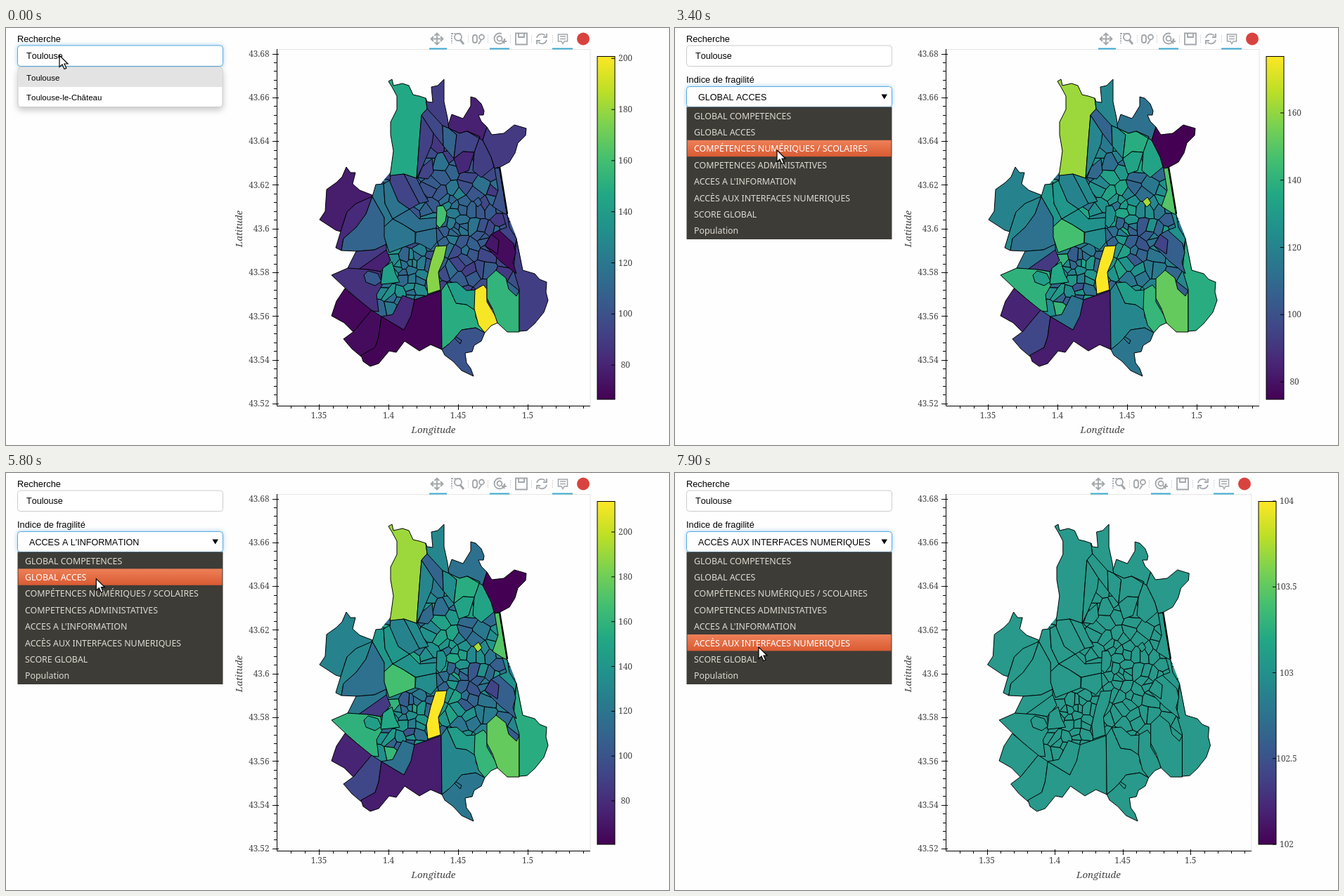
These frames come from a looping animation (943x594 px, 8000 ms). An HTML page:

```html
<!DOCTYPE html>
<html lang="fr">
<head>
<meta charset="utf-8">
<title>Indice de fragilité</title>
<style>
html, body { margin: 0; width: 100%; height: 100%; overflow: hidden; background: #fefefe; }
svg { display: block; width: 943px; height: 594px; }
text { white-space: pre; }
.ui { font: 12.6px "Liberation Sans", Arial, sans-serif; font-kerning: none; fill: #000; }
.label { font-size: 12.8px; }
.small { font-size: 11.5px; }
.option { font: 12.4px "Noto Sans", sans-serif; fill: #dfdbd2; }
.tick { font: 11.8px "Noto Serif", serif; fill: #444; }
.title { font: italic 13.4px "Noto Serif", serif; fill: #444; }
.field { fill: #fff; stroke: #ccc; }
.focus { stroke: #5aaade; filter: drop-shadow(0 0 3px rgba(102, 175, 233, .6)); }
.map path { stroke: #000; stroke-width: 1; stroke-linejoin: round; }
.icons { fill: none; stroke: #a1a6a9; stroke-width: 1.8; }
</style>
</head>
<body>
<svg viewBox="0 0 943 594">
  <defs>
    <linearGradient id="scale" x1="0" y1="1" x2="0" y2="0"></linearGradient>
    <linearGradient id="hot" x1="0" y1="0" x2="0" y2="1">
      <stop stop-color="#ee8058"/><stop offset="1" stop-color="#d95b32"/>
    </linearGradient>
    <clipPath id="inner"><path d="M547 205 566 200 580 205 588 124 599 108 610 125 630 140 645 145 680 152 700 195 713 265 726 298 735 345 731 385 700 398 684 404 660 410 640 400 621 380 582 395 566 430 534 415 515 402 520 385 520 350 535 345 540 312 520 310 535 298 535 250 533 222z"/></clipPath>
  </defs>

  <path d="M385 30.5H831" id="top" stroke="#e5e5e5"/>
  <path d="M831 30V538" id="right" stroke="#e5e5e5"/>
  <g class="map" id="map">
    <g id="cells" clip-path="url(#inner)"></g>
    <!-- north -->
    <path data-v=".6 .85" d="M544 76 549 73 551 82 564 79 573 82 579 95 588 97 597 100 599 115 591 124 588 160 584 214 566 208 546 211 549 190 551 175 547 152 547 134 556 116 556 97 549 84z"/>
    <path data-v=".18 .46" d="M597 100 599 105 607 106 605 84 614 82 623 73 623 105 628 128 630 143 621 139 608 130 599 115z"/>
    <path data-v=".09 .37" d="M630 143 629 138 634 123 650 129 661 111 661 98 668 100 676 108 680 118 679 124 672 124 676 133 684 141 678 160 656 147 645 150z"/>
    <path data-v=".17 0" d="M684 141 691 152 708 150 723 138 740 143 739 153 728 164 724 178 716 191 703 198 695 200 690 184 678 160z"/>
    <path data-v=".19 .45" d="M591 124 608 150 606 165 592 198 584 214 588 160z"/>
    <path data-v=".22 .32" d="M599 115 621 139 622 168 608 150 591 124z"/>
    <path data-v=".32 .48" d="M621 139 630 143 641 152 637 186 622 168z"/>
    <path data-v=".2 .62" d="M630 143 645 150 656 147 674 155 666 177 650 176 637 186 641 152z"/>
    <path data-v=".11 .58" d="M637 186 650 176 666 177 658 203 644 208z"/>
    <path data-v=".18 .58" d="M656 147 678 160 690 184 694 198 676 213 664 203 666 177 674 155z"/>
    <path data-v=".2 .34" d="M592 198 606 186 608 205 600 215 586 213z"/>
    <path data-v=".25 .73" d="M695 200 702 199 713 268 706 263 692 254 700 231z"/>
    <!-- west -->
    <path data-v=".08 .44" d="M446 273 454 261 456 230 470 220 478 212 484 198 490 206 497 206 493 222 503 231 521 238 515 248 498 250 485 262 476 290 469 288z"/>
    <path data-v=".12 .46" d="M476 290 485 262 498 250 521 240 512 265 498 284 480 300 477 317 469 313z"/>
    <path data-v=".32 .37" d="M480 300 498 284 512 265 521 240 538 270 540 284 539 299 541 308 524 316 500 318 477 317z"/>
    <path data-v=".39 .52" d="M521 240 526 223 537 222 539 250 550 272 538 283 538 270z"/>
    <path data-v=".38 .52" d="M537 222 546 217 558 247 574 258 550 272 539 250z"/>
    <path data-v=".2 .44" d="M546 219 547 210 566 208 588 250 574 258 558 247z"/>
    <path data-v=".24 .47" d="M566 208 584 214 594 235 601 247 588 250z"/>
    <path data-v=".36 .5" d="M550 272 574 258 588 272 613 270 612 285 583 291 565 280z"/>
    <path data-v=".39 .7" d="M538 283 550 272 565 280 582 291 582 306 545 320 538 298z"/>
    <path data-v=".36 .48" d="M583 291 612 285 613 305 604 316 590 308 582 306z"/>
    <path data-v=".17 .39" d="M486 342 498 318 524 316 541 308 541 317 500 345z"/>
    <path data-v=".09 .17" d="M500 345 541 316 547 331 533 347 515 344z"/>
    <path data-v=".14 .64" d="M463 352 486 342 515 344 533 347 535 366 527 380 530 404 520 403 500 386 482 370z"/>
    <path data-v=".28 .55" d="M509 352 515 346 529 350 534 361 525 367 512 362z"/>
    <!-- south -->
    <path data-v=".02 .1" d="M482 371 500 386 520 402 494 433 481 420 463 410 470 389z"/>
    <path data-v=".03 .21" d="M520 402 534 411 530 440 525 455 505 468 492 457 480 443 495 432z"/>
    <path data-v=".01 .08" d="M534 411 566 430 581 387 605 379 619 374 620 458 604 451 588 460 567 446 555 462 545 460 530 478 518 482 508 475 505 466 525 455 530 440z"/>
    <path data-v=".12 .37" d="M534 411 550 408 564 381 581 387 576 410 566 430z"/>
    <path data-v=".62 .46" d="M619 374 627 363 640 392 655 394 668 402 668 412 681 434 668 427 648 430 638 442 630 450 620 458z"/>
    <path data-v=".55 .55" d="M627 363 641 362 655 374 668 373 667 402 655 394 640 392z"/>
    <path data-v=".26 .39" d="M620 458 630 450 638 442 648 430 668 427 681 434 676 446 666 452 663 461 653 463 655 477 661 485 665 496 648 488 636 475 624 466z"/>
    <path d="M638 442 646 450 648 445 640 440" fill="none"/>
    <path data-v=".99 .66" d="M667 373 679 366 684 372 684 390 697 412 699 420 690 424 681 434 672 423 666 400z"/>
    <path data-v=".65 .76" d="M684 357 697 345 711 356 715 372 726 382 730 374 730 433 713 433 699 420 692 400 684 385z"/>
    <path data-v=".18 .62" d="M722 345 726 300 735 345 752 350 759 358 769 362 768 376 771 388 765 405 752 421 741 431 730 432 730 372z"/>
    <path data-v=".2 .5" d="M706 263 713 266 716 284 726 300 724 312 701 288 712 284z"/>
    <path data-v=".03 .3" d="M681 310 690 294 701 288 722 307 725 320 721 334 726 350 704 333z"/>
    <path data-v=".06 .2" d="M681 310 690 294 701 302 699 322 689 315z"/>
    <!-- centre -->
    <path data-v=".82 1" d="M611 311 627 310 623 329 615 348 618 373 600 379 598 359 604 333z"/>
    <path data-v=".7 .5" d="M613 254 622 253 627 263 625 275 617 285 612 280z"/>
    <path data-v=".55 .6" d="M533 365 536 342 549 333 554 350 560 362 545 364z"/>
    <path data-v=".3 .87" d="M665 247 672 241 677 249 671 255z"/>
    <path d="M702 198 713 265" fill="none" style="stroke-width:2.4"/>
  </g>

  <path id="axes" fill="none" stroke="#000"/>
  <g id="yLabels"></g>
  <g id="xLabels"></g>
  <text class="title" text-anchor="middle" transform="translate(336 286) rotate(-90)">Latitude</text>
  <text class="title" text-anchor="middle" y="577" id="xTitle">Longitude</text>

  <g id="side">
    <g class="icons">
      <path d="M605 15.500H621M613 7.500V23.500M608 12 604.500 15.500 608 19M618 12 621.500 15.500 618 19M609.500 11 613 7.500 616.500 11M609.500 20 613 23.500 616.500 20"/>
      <path d="M634 8H648M634 7V22" stroke-dasharray="2 1.500"/>
      <circle cx="643" cy="13" r="5"/><path d="M646 17 651 23" stroke-width="3"/>
      <rect x="664" y="10" width="6" height="11" rx="3"/><circle cx="676.500" cy="13" r="3.500"/><path d="M676 17 672 23"/>
      <circle cx="702" cy="15" r="7.500" stroke-dasharray="38 9"/><circle cx="702" cy="15" r="3.500"/><path d="M705 19H712M708.500 15.500V22.500"/>
      <path d="M725 7.500H741V23.500H725zM729 8V13H737V8"/>
      <path d="M755 14A7 7 0 0 1 767 11M769 17A7 7 0 0 1 757 20M769 8V13H764M755 23V18H760"/>
      <path d="M785.500 9H798.500V19H794L792 22.500 790 19H785.500zM788 12H796M788 15.500H796" stroke-width="1.500"/>
      <path d="M657.500 10V21M685.500 10V21M717.500 10V21M747.500 10V21M777.500 10V21" stroke="#d5d5d5" stroke-width="1" stroke-dasharray="2 1"/>
      <path d="M602 29.500H627M688 29.500H716M777 29.500H806" stroke="#3ba9d0"/>
    </g>
    <circle cx="821" cy="15.500" r="9" fill="#d9433f"/>
    <rect x="841" y="40.500" width="25" height="488.500" fill="url(#scale)" stroke="#000"/>
    <g id="legend"></g>
  </g>

  <g class="ui">
    <text class="label" x="16" y="19.500">Recherche</text>
    <rect class="field" id="search" x="16.500" y="25" width="292" height="29.500" rx="4"/>
    <text x="29" y="44">Toulouse</text>
    <g id="select">
      <text class="label" x="16" y="78">Indice de fragilité</text>
      <rect class="field" id="selectBox" x="16.500" y="83.500" width="292" height="29" rx="4"/>
      <text x="33" y="102.500" id="choice"></text>
      <path d="M293.500 94.500H302L297.700 101.500z"/>
    </g>
    <g id="suggest">
      <rect x="17" y="56" width="291" height="56.500" rx="4" fill="#fff" stroke="#c8c8c8" style="filter:drop-shadow(0 4px 5px rgba(0,0,0,.22))"/>
      <rect x="17.500" y="57" width="290" height="27" fill="#e4e3e3"/>
      <text x="29" y="74.500" class="small">Toulouse</text>
      <text x="29" y="102.500" class="small">Toulouse-le-Château</text>
    </g>
  </g>
  <g id="menu">
    <rect x="16.500" y="112.500" width="292" height="188.500" fill="#3d3c37"/>
    <rect id="hover" x="17.500" width="290" height="23.400" fill="url(#hot)"/>
    <g id="options"></g>
  </g>
  <path id="cursor" d="M0 0V16.500L4 13 7 19.500 9.800 18.200 7 12H12z" fill="#fff" stroke="#000" stroke-width="1.200"/>
</svg>
<script>
const $ = id => document.getElementById(id);
const names = ["GLOBAL COMPETENCES", "GLOBAL ACCES", "COMPÉTENCES NUMÉRIQUES / SCOLAIRES",
  "COMPETENCES ADMINISTATIVES", "ACCES A L'INFORMATION", "ACCÈS AUX INTERFACES NUMERIQUES",
  "SCORE GLOBAL", "Population"];
const ROW = 23.4, MENU_TOP = 113, LOOP = 8000;

// Colour scale
const ramp = ["440154", "482475", "414487", "355f8d", "2a788e", "21918c", "22a884", "44bf70", "7ad151", "bddf26", "fde725"]
  .map(h => [0, 2, 4].map(i => parseInt(h.slice(i, i + 2), 16)));
function colour(v) {
  const p = Math.max(0, Math.min(.9999, v)) * 10, i = Math.floor(p);
  return `rgb(${ramp[i].map((c, k) => Math.round(c + (ramp[i + 1][k] - c) * (p - i)))})`;
}
$("scale").innerHTML = ramp.map((c, i) => `<stop offset="${i / 10}" stop-color="rgb(${c})"/>`).join("");

// Small districts: Voronoi cells around seeded points
let seed = 11;
function random() {
  seed = (seed + 0x6D2B79F5) | 0;
  let r = Math.imul(seed ^ (seed >>> 15), 1 | seed);
  r = (r + Math.imul(r ^ (r >>> 7), 61 | r)) ^ r;
  return ((r ^ (r >>> 14)) >>> 0) / 4294967296;
}
const jitter = size => (random() - .5) * size;
const sites = [];
for (let i = 0; i < 140; i++) {
  const r = Math.pow((i + .5) / 140, .7), a = i * 2.39996;
  sites.push([640 + r * 105 * Math.cos(a) + jitter(20), 283 + r * 130 * Math.sin(a) + jitter(20)]);
}
for (let i = 0; i < 28; i++) sites.push([563 + jitter(66), 365 + jitter(85)]);

function cell(site) {
  let poly = [[500, 100], [790, 100], [790, 480], [500, 480]];
  for (const other of sites) {
    if (other === site) continue;
    const dx = other[0] - site[0], dy = other[1] - site[1];
    const mid = (dx * (other[0] + site[0]) + dy * (other[1] + site[1])) / 2;
    const side = p => p[0] * dx + p[1] * dy - mid;
    const cut = [];
    poly.forEach((p, i) => {
      const q = poly[(i + 1) % poly.length], a = side(p), b = side(q);
      if (a <= 0) cut.push(p);
      if (a * b < 0) cut.push([p[0] + (q[0] - p[0]) * a / (a - b), p[1] + (q[1] - p[1]) * a / (a - b)]);
    });
    poly = cut;
  }
  return poly;
}
$("cells").innerHTML = sites.map(s => {
  const core = Math.exp(-(((s[0] - 630) / 50) ** 2 + ((s[1] - 270) / 60) ** 2));
  const west = s[0] < 600 && s[1] > 310, east = s[0] > 645 && s[1] > 265;
  const a = .25 + .14 * core + (west ? .16 : 0) + jitter(.2);
  const b = .46 - (east ? .06 : 0) + jitter(west ? .4 : .28);
  const d = cell(s).map(p => p.map(n => n.toFixed(1)).join(" ")).join(" ");
  return `<path data-v="${a.toFixed(2)} ${b.toFixed(2)}" d="M${d}z"/>`;
}).join("");
const regions = [...document.querySelectorAll("[data-v]")]
  .map(el => ({ el, values: el.dataset.v.split(" ").map(Number) }));

// Static labels
const label = (x, y, text, anchor) => `<text class="tick" x="${x}" y="${y}" text-anchor="${anchor}">${text}</text>`;
const count = n => [...Array(n).keys()];
$("yLabels").innerHTML = count(9).map(i => label(374.5, 40.7 + i * 62.3, +(43.68 - i * .02).toFixed(2), "end")).join("");
$("options").innerHTML = names.map((n, i) => `<text class="option" x="27" y="${129.5 + i * ROW}">${n}</text>`).join("");

const views = [
  { min: 66.6, max: 200.9, from: 80, step: 20, set: 0 },
  { min: 74.8, max: 176.9, from: 80, step: 20, set: 1 },
  { min: 60.6, max: 213.8, from: 80, step: 20, set: 1 },
  { min: 102, max: 104, from: 102, step: .5, flat: "#28998a" }
];
let shown = -1;
function showView(index) {
  if (index === shown) return;
  shown = index;
  const v = views[index], shift = v.flat ? -11 : 0, right = 831 + shift, k = (right - 385) / 446;
  const px = x => 385 + (x - 385) * k;
  $("map").setAttribute("transform", `translate(${385 - 385 * k} 0) scale(${k} 1)`);
  $("side").setAttribute("transform", `translate(${shift} 0)`);
  $("top").setAttribute("d", `M385 30.5H${right}`);
  $("right").setAttribute("d", `M${right} 30V538`);
  let axes = `M385.5 30V538.5H${right}`;
  for (let i = 0; i <= 40; i++) {
    const y = Math.round(36.5 + i * 12.46) + .5;
    axes += i % 5 ? `M381 ${y}H385` : `M379 ${y}H388`;
  }
  for (let i = -2; i <= 19; i++) {
    const x = Math.round(px(445 + i * 19.8)) + .5;
    if (x < right) axes += i % 5 ? `M${x} 538V542` : `M${x} 536V544`;
  }
  $("axes").setAttribute("d", axes);
  $("xLabels").innerHTML = count(4).map(i => label(px(445 + i * 99), 556, +(1.35 + i * .05).toFixed(2), "middle")).join("");
  $("xTitle").setAttribute("x", (385 + right) / 2);
  let legend = "";
  for (let n = v.from; n <= v.max; n += v.step) {
    const y = 529 - (n - v.min) / (v.max - v.min) * 489;
    legend += `<path d="M861 ${y}H866" stroke="#000"/>` + label(881, y + 4, n, "middle");
  }
  $("legend").innerHTML = legend;
  for (const { el, values } of regions) el.setAttribute("fill", v.flat || colour(values[v.set]));
}

// Pointer path: time, x, y
const path = [
  [0, 76, 39], [700, 76, 39], [1100, 95, 98], [1300, 95, 98], [1600, 98, 138], [1700, 98, 138],
  [2000, 99, 155], [2100, 99, 155], [2200, 112, 154], [2300, 112, 154], [2500, 197, 152], [2700, 190, 140],
  [3100, 145, 98], [3200, 145, 98], [3400, 145, 174], [3600, 140, 205], [3800, 140, 205], [3900, 136, 220],
  [5000, 136, 220], [5100, 134, 157], [5400, 128, 103], [5600, 128, 103], [6200, 129, 246], [6400, 129, 246],
  [6500, 129, 250], [6700, 129, 250], [7300, 115, 102], [7600, 115, 102], [7700, 118, 160], [7800, 118, 160],
  [7900, 119, 248], [8000, 119, 248]
];
function pointer(t) {
  const i = path.findIndex(p => p[0] > t), [t0, x0, y0] = path[i - 1], [t1, x1, y1] = path[i];
  const f = (t - t0) / (t1 - t0);
  return [x0 + (x1 - x0) * f, y0 + (y1 - y0) * f];
}
const within = (t, a, b) => t >= a && t < b;
const show = (id, on) => { $(id).style.display = on ? "" : "none"; };

function draw(now) {
  const t = Math.floor((now % LOOP) / 100) * 100;
  const [x, y] = pointer(t);
  const chosen = t < 2000 ? 0 : t < 4000 ? 1 : t < 6600 ? 4 : 5;
  const open = within(t, 1300, 2000) || within(t, 3300, 4000) || within(t, 5400, 6500) || t >= 7400;
  const row = y < MENU_TOP ? chosen : Math.min(7, Math.floor((y - MENU_TOP) / ROW));
  showView(t < 2600 ? 0 : t < 4500 ? 1 : t < 7000 ? 2 : 3);
  show("suggest", t < 500);
  show("select", t >= 500);
  show("menu", open);
  $("search").classList.toggle("focus", t < 1300);
  $("selectBox").classList.toggle("focus", t >= 1300);
  $("choice").textContent = names[chosen];
  $("hover").setAttribute("y", MENU_TOP + row * ROW);
  [...$("options").children].forEach((el, i) => { el.style.fill = i === row ? "#fff" : ""; });
  $("cursor").setAttribute("transform", `translate(${x} ${y})`);
}
const start = performance.now();
function tick() {
  draw(performance.now() - start);
  requestAnimationFrame(tick);
}
tick();
</script>
</body>
</html>
```
